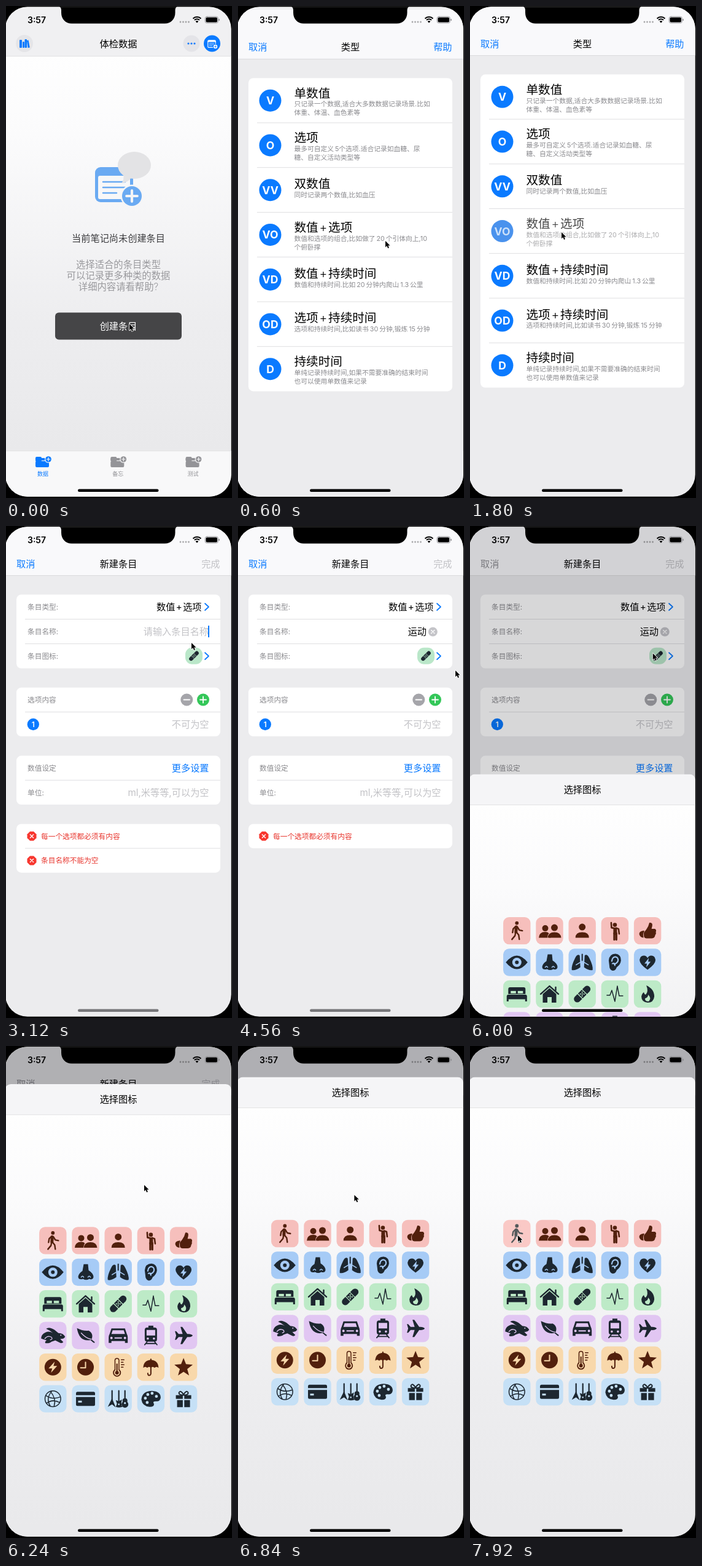
Recreate the animation shown at these times as an HTML page with a canvas. Size 368 px wide and 800 px high, loop 8000 ms.

```html
<!DOCTYPE html>
<html lang="zh-CN">
<head>
<meta charset="utf-8">
<style>
html, body { margin: 0; width: 100%; height: 100%; overflow: hidden; background: #000; }
canvas { display: block; width: 368px; height: 800px; }
</style>
</head>
<body>
<canvas id="stage"></canvas>
<script>
const W = 368, H = 800, LOOP = 8000, STEP = 120;
const canvas = document.getElementById('stage');
const scale = window.devicePixelRatio || 1;
canvas.width = W * scale;
canvas.height = H * scale;
const g = canvas.getContext('2d');
const FONT = 'Inter, "Noto Sans CJK SC", "Noto Sans CJK", sans-serif';
const BLUE = '#0a7aff', GREY = '#8a8a8e', PALE = '#c2c2c6', PAGE = '#ececee';

// Drawing helpers
function text(s, x, y, size, color = '#000', weight = 400, align = 'left') {
  g.font = `${weight} ${size}px ${FONT}`;
  g.textAlign = align;
  g.fillStyle = color;
  const spaced = s.replace(/ \+ /g, '\u200a+\u200a').replace(/ /g, '\u2009');
  g.fillText(spaced, x, y + size * 0.37);
}
function rect(x, y, w, h, color) {
  g.fillStyle = color;
  g.fillRect(x, y, w, h);
}
function round(x, y, w, h, r, color) {
  g.fillStyle = color;
  g.beginPath();
  g.roundRect(x, y, w, h, r);
  g.fill();
}
function disc(x, y, r, color, ry = r) {
  g.fillStyle = color;
  g.beginPath();
  g.ellipse(x, y, r, ry, 0, 0, 7);
  g.fill();
}
function line(d, width, color) {
  g.lineWidth = width;
  g.strokeStyle = color;
  g.stroke(new Path2D(d));
}
function fill(d, color) {
  g.fillStyle = color;
  g.fill(new Path2D(d));
}
function at(x, y, k, alpha, draw) {
  g.save();
  g.translate(x, y);
  g.scale(k, k);
  g.globalAlpha *= alpha;
  draw();
  g.restore();
}

// Icons: f fill, c cut out, l line, k cut line (with width); "o x y r" is a circle
const art = {
  walk: 'f o0 -12.5 2.9|l5 M-1 -6L-1.5 2|l2.4 M-2 -7L-6 -3L-7 3M1 -6L4 -1L9 0M-1 2L3 7L4 14M-2 2L-3 8L-8 14',
  pair: 'f o-7 -4 5M-17.5 11.5Q-17 2 -7 2Q1 2 2 11.5Z|k3 o8 -5 5.5M-2 11.5Q-1 2 8 2|f o8 -5 5.5M-3 11.5Q-2 2.5 8 2.5Q18 2.5 19 11.5Z',
  person: 'f o0 -6 5.5M-11 11.5Q-11 2.5 0 2.5Q11 2.5 11 11.5Z',
  wave: 'f o0 -9.5 3.3|l6 M.5 -2V4|l2.6 M-6 -13L-5.5 -5L-1 -4M2 -4.5L6 -3L7 5|l3.2 M-1 4V14.5M2.4 4V14.5',
  thumb: 'f M-2 -2L1 -7L3 -13Q9 -14 7.5 -7L6.5 -3H12Q15 -1 13.5 2Q14.5 5 12.5 7Q12 12 7 12.5H-2Q-6 12 -6 8V3ZM-7 0Q-14 1 -13.5 6Q-12 11 -6.5 11.5Q-8 5 -5 0Z',
  eye: 'f M-18 0Q0 -22 17.5 0Q0 22 -18 0Z|c o0 0 7.5|f o0 0 3',
  nose: 'f M-3 -13H4L5 -3Q13 2 13 8Q12 13 6 11Q1 14 -4 11Q-12 13 -12 7Q-11 2 -5 -2Z|k1.5 M-7 8Q-5 5 -3 8M4 8Q6 5 8 8',
  lungs: 'f M-4 -11Q-8 -15 -12 -6Q-18 6 -17 12.5Q-11 14 -3 8ZM4 -11Q8 -15 12 -6Q18 6 17 12.5Q11 14 3 8Z|l2 M0 -13V-2|k1.5 M0 -2L-10 4M0 -2L10 4',
  ear: 'f M-10 -3Q-9 -14 1 -14Q10 -13 10 -3Q9 4 3 8Q1 14 -4 13.5Q-9 12 -9 5Z|k2 M-5 -2Q-4 -9 1 -9Q6 -8 5 -2Q3 2 -1 3M-4 2Q0 0 0 5',
  heart: 'f M0 12Q-13 3 -13 -4Q-12 -11 -6 -11Q-2 -11 0 -7Q2 -11 6 -11Q12 -11 13 -4Q13 3 0 12Z|c M2 -7L-5 2H-1L-2 8L5 -1H1Z',
  bed: 'f M-11 -11H11Q14 -11 14 -8V0H-14V-8Q-14 -11 -11 -11ZM-16.5 3Q-16 1 -14 1H14Q16 1 16.5 3V12H13.5V8.5H-13.5V12H-16.5Z|c M-10 -5H-1.5V-1H-10ZM1.5 -5H10V-1H1.5Z',
  house: 'l2.4 M-14.5 0L0 -13L14.5 0M10 -11V-6|f M-11 0L0 -9.5L11 0V14H3.5V5H-3.5V14H-11Z',
  bandage: 'l11 M-8 8L8 -8|k1.2 M-8 -1L1 8M-1 -8L8 1|c o0 0 1.1o-3 0 1.1o3 0 1.1o0 -3 1.1o0 3 1.1',
  pulse: 'l1.5 M-13 2H-8L-5 -6L0 12L4 -13L7 3H13',
  flame: 'f M-2 -14Q11 -8 11 4Q10 14 0 14Q-10 13 -10 4Q-9 -1 -6 -3Q-5 1 -3 1Q2 -4 -2 -14Z|c M1 1Q7 7 2 12Q-5 12 -4 7Q1 6 1 1Z',
  hare: 'f M-19 5Q-19 -2 -12 -5Q-6 -8 0 -4Q-6 -9 -11 -11Q-6 -15 3 -9L9 -4Q17 -4 20 2Q18 6 12 5.5Q15 9 17 10.5Q16 13 12 12L4 8L-2 10Q-5 13 -12 12.5Q-14 10 -10 8Z|c o13 -.5 1|k1.3 M-13 5Q-8 -1 -2 3Q0 6 -4 7',
  leaf: 'f M-14 -12Q-4 -7 5 -8Q14 -3 9.5 7Q-10 12 -14 -12Z|l2 M6 4Q11 9 14 11|k1.3 M-7 -4Q1 5 9 6',
  car: 'f M-11 -11.5H11L14 -2.5Q15.5 0 15.5 3V12H11V9H-11V12H-15.5V3Q-15.5 0 -14 -2.5Z|c M-9 -8.5H9L11 -2.5H-11Zo-11 4 2o11 4 2M-6 3H6V5H-6Z',
  train: 'f M-6 -13H6Q10 -13 10 -9V6Q10 10 6 10H-6Q-10 10 -10 6V-9Q-10 -13 -6 -13ZM-4 -16H4V-13H-4Z|c M-7 -9H7V0H-7Zo-5 5 1.8o5 5 1.8|l1.8 M-6 10L-10 15M6 10L10 15M-8 13H8',
  plane: 'f M15 0Q13 -3 6 -2.5L-2 -14H-5L-1.5 -2.5H-8L-12 -7H-14L-12 0L-14 7H-12L-8 2.5H-1.5L-5 14H-2L6 2.5Q13 3 15 0Z',
  bolt: 'f o0 0 13.5|c M3 -9L-7 2H-1L-3 9L7 -2H1Z',
  clock: 'f o0 0 13.5|k2 M0 -8V1H-8',
  heat: 'l8 M-2 -11V8|f o-2 9 6.5|k5 M-2 -11V8|c o-2 9 4.7|l2 M-2 -5V9|f o-2 9 3|l1.6 M5 -12H9.5M5 -8H8M5 -4H9.5M5 0H8',
  umbrella: 'f M-12.5 1Q-12 -11 0 -12Q12 -11 12.5 1Q9 -2 6 1Q3 -2 0 1Q-3 -2 -6 1Q-9 -2 -12.5 1Z|l2 M0 -13V10Q0 14 -4 13Q-5 12 -5 10',
  star: 'f M0 -15L4 -5L15 -4L6 3L9 13.5L0 7.5L-9 13.5L-6 3L-15 -4L-4 -5Z',
  globe: 'l1.5 o0 0 12.8M-11 -5Q0 2 12 -3M-10 7Q0 0 11 6M-4 -12Q6 0 2 12M-2 -12Q-12 0 -4 12',
  card: 'f M-13 -11.5H13Q15.5 -11.5 15.5 -9V-6H-15.5V-9Q-15.5 -11.5 -13 -11.5ZM-15.5 -3H15.5V9Q15.5 11.5 13 11.5H-13Q-15.5 11.5 -15.5 9Z|c M-12 3H-6V6H-12Z',
  guitars: 'l2.2 M-10 -13V6M1 -13V6M11 -13V6|f M-10 -1L-17 13L-10 9L-4 14ZM-4 2L1 4L6 1L5 7L7 13Q1 15 -4 13L-2 8Zo11 3 4o11 9 5.5|c o1 9 1.3o11 7 1.6',
  palette: 'f M-15.5 1Q-14 -13 2 -13Q16 -12 16 -2Q15 5 8 4Q2 4 5 8Q6 13 -2 13Q-14 12 -15.5 1Z|c o-9 -1 2.4o-5 -7 2.4o2 -9 2.4o9 -4 2.4o-6 6 2.4',
  gift: 'f M-12.5 -6H-1.2V0H-12.5ZM1.2 -6H12.5V0H1.2ZM-10.5 2H-1.2V13.5H-10.5ZM1.2 2H10.5V13.5H1.2Z|l2 M0 -6Q-8 -6 -7.5 -10Q-5 -15 0 -7Q5 -15 7.5 -10Q8 -6 0 -6'
};
const DARK = '#1d2730', BROWN = '#52200d';
const shelves = [
  ['#f6bfbc', BROWN, 'walk pair person wave thumb'],
  ['#a6cbf6', DARK, 'eye nose lungs ear heart'],
  ['#bdeac7', DARK, 'bed house bandage pulse flame'],
  ['#e1c6f2', DARK, 'hare leaf car train plane'],
  ['#f8d8ab', BROWN, 'bolt clock heat umbrella star'],
  ['#c5e0f6', DARK, 'globe card guitars palette gift']
];
function circlePath(_, x, y, r) {
  return `M${x - r} ${y}a${r} ${r} 0 1 0 ${2 * r} 0a${r} ${r} 0 1 0 ${-2 * r} 0Z`;
}
function icon(name, ink, bg) {
  for (const part of art[name].split('|')) {
    const cut = part.indexOf(' ');
    const op = part[0], width = +part.slice(1, cut);
    const d = part.slice(cut + 1).replace(/o(-?[\d.]+) (-?[\d.]+) ([\d.]+)/g, circlePath);
    const color = 'ck'.includes(op) ? bg : ink;
    if (width) line(d, width, color); else fill(d, color);
  }
}

// Motion helpers
const sprung = (t, start) => {
  const x = Math.max(0, t - start) * 0.01826;
  return (1 + x) * Math.exp(-x);
};
const track = [
  [0, 201, 517], [240, 201, 517], [600, 240, 382], [960, 240, 382], [1680, 149, 368],
  [2040, 149, 368], [2760, 302, 178], [3120, 302, 190], [3360, 302, 190], [4080, 354, 235],
  [4560, 354, 235], [5400, 302, 206], [5960, 302, 206], [6240, 225, 226], [6600, 210, 230],
  [7560, 78, 308], [8000, 78, 308]
];
function pointer(t) {
  const i = track.findIndex(p => p[0] > t);
  const [a, b] = [track[i - 1], track[i]];
  const u = (t - a[0]) / (b[0] - a[0]), e = u * u * (3 - 2 * u);
  at(a[1] + (b[1] - a[1]) * e, a[2] + (b[2] - a[2]) * e, 0.9, 1, () => {
    const d = 'M0 0V11.5L2.7 9L4.6 13.2L6.6 12.3L4.8 8.2H8.4Z';
    line(d, 1.8, '#fff');
    fill(d, '#000');
  });
}

function backdrop(top) {
  const grad = g.createLinearGradient(0, top, 0, 720);
  grad.addColorStop(0, '#fefefe');
  grad.addColorStop(0.2, '#fbfbfc');
  grad.addColorStop(0.68, '#ededef');
  grad.addColorStop(1, '#e9e9eb');
  rect(0, top, W, H, grad);
}

function note(bg, color) {
  round(-31, -28, 62, 57, 9, color);
  round(-26, -14, 52, 38, 3, bg);
  line('M-18 -4H18M-18 5H18M-18 14H4', 2.6, color);
}
function plus(x, y, r, color, bg, ring) {
  disc(x, y, r + ring, bg);
  disc(x, y, r, color);
  const k = r * 0.55;
  line(`M${x - k} ${y}h${2 * k}M${x} ${y - k}v${2 * k}`, r * 0.26, bg);
}

function home() {
  backdrop(82);
  rect(0, 0, W, 82, '#f0f0f2');
  rect(0, 81.5, W, 0.7, '#dcdcde');
  disc(30, 61, 14, '#e5e5e8');
  round(22, 55, 4, 13, 1, BLUE);
  round(27, 58, 3, 10, 1, BLUE);
  round(30.5, 54, 3.5, 14, 1, BLUE);
  fill('M34 56l2.5 -.6l2.3 12l-3.3 .6z', BLUE);
  text('体检数据', 183, 61, 15.3, '#000', 500, 'center');
  disc(302, 61, 13.5, '#e4e4e8');
  for (const x of [297, 302, 307]) disc(x, 61, 1.6, BLUE);
  disc(335.5, 61, 13.5, BLUE);
  at(335, 61.5, 0.22, 1, () => note(BLUE, '#fff'));
  plus(341, 66, 3.2, '#fff', BLUE, 1);

  const blue = '#6aaaf2';
  at(176, 290, 1, 1, () => note('#f7f7f8', blue));
  disc(209, 259, 27, '#e3e3e5', 22);
  fill('M191 272Q193 283 188 288Q199 287 204 279Z', '#e3e3e5');
  plus(205, 309, 16, blue, '#f5f5f6', 2.5);

  text('当前笔记尚未创建条目', 183, 377, 15.2, '#3c3c3f', 400, 'center');
  ['选择适合的条目类型', '可以记录更多种类的数据', '详细内容请看帮助?'].forEach((s, i) =>
    text(s, 183, 420 + 18 * i, 15.35, '#99999d', 300, 'center'));
  round(80, 498.5, 206, 44, 6, '#454547');
  text('创建条目', 183, 520.5, 15.2, '#fff', 500, 'center');

  rect(0, 723, W, 80, '#f8f8f9');
  rect(0, 723, W, 0.7, '#dadadc');
  ['数据', '备忘', '测试'].forEach((s, i) => {
    const x = 60 + 122.3 * i, c = i ? '#949498' : BLUE;
    round(x - 12, 733, 10, 8, 2, c);
    round(x - 12, 735, 22, 4, 1.5, c);
    round(x - 12, 740, 22, 10, 2, c);
    plus(x + 9, 737, 4.8, c, '#f8f8f9', 1.2);
    text(s, x, 760.5, 9, c, 500, 'center');
  });
}

function navBar(title, right, rightColor, tint = BLUE) {
  rect(0, -1, W, H + 2, PAGE);
  rect(0, 0, W, 80, '#f9f9fb');
  rect(0, 80, W, 0.8, '#d8d8da');
  text('取消', 17, 61, 15.2, tint);
  text(title, 183, 61, 15.2, '#000', 500, 'center');
  text(right, 348.5, 61, 15.2, rightColor, 400, 'right');
}
function card(y, rows, pitch) {
  round(17, y, 332, rows * pitch, 8, '#fff');
  for (let i = 1; i < rows; i++) rect(31, y + i * pitch - 0.5, 318, 1, '#dfdfe1');
}

const kinds = [
  ['V', '单数值', '只记录一个数据,适合大多数数据记录场景.比如', '体重、体温、血色素等'],
  ['O', '选项', '最多可自定义 5个选项.适合记录如血糖、尿', '糖、自定义活动类型等'],
  ['VV', '双数值', '同时记录两个数值,比如血压'],
  ['VO', '数值 + 选项', '数值和选项的组合,比如做了 20 个引体向上,10', '个俯卧撑'],
  ['VD', '数值 + 持续时间', '数值和持续时间.比如 20 分钟内爬山 1.3 公里'],
  ['OD', '选项 + 持续时间', '选项和持续时间,比如读书 30 分钟,锻炼 15 分钟'],
  ['D', '持续时间', '单纯记录持续时间,如果不需要准确的结束时间', '也可以使用单数值来记录']
];
function typePage(t) {
  navBar('类型', '帮助', BLUE);
  const pitch = 72.75;
  card(111.3, kinds.length, pitch);
  kinds.forEach(([mark, title, first, second], i) => {
    const pressed = i === 3 && t >= 1800;
    at(0, 147.8 + i * pitch, 1, pressed ? 0.72 : 1, () => {
      const lift = second ? 0 : 2.1;
      disc(52.5, 0, 18, pressed ? '#0568e6' : BLUE);
      text(mark, 52.5, 0, 17.6, '#fff', 700, 'center');
      text(title, 91.5, -12.4 + lift, 19.6, '#000', 350);
      text(first, 91.5, 5.8 + lift, 10.75, GREY);
      if (second) text(second, 91.5, 19.8, 10.75, GREY);
    });
  });
}

function cross(x, y, k, color) {
  line(`M${x - k} ${y - k}l${2 * k} ${2 * k}M${x + k} ${y - k}l${-2 * k} ${2 * k}`, 1.4, color);
}
function chevron(y) {
  line(`M324 ${y - 5.5}L330 ${y}L324 ${y + 5.5}`, 1.7, BLUE);
}
function failure(s, y) {
  fill(`M39 ${y - 7.5}h6l4.5 4.5v6l-4.5 4.5h-6l-4.5 -4.5v-6z`, '#f7372f');
  cross(42, y, 2.6, '#fff');
  text(s, 57, y, 11.7, '#e8362e');
}
function nameField(t) {
  const typed = 'yun dong';
  const named = t >= 3360, done = t >= 4560;
  let value = '请输入条目名称';
  if (done) value = '运动';
  else if (named) value = typed.slice(0, 1 + Math.floor((t - 3360) / 135));
  const right = named ? 307 : 330;
  text(value, right, 171.5, 15.2, named ? '#000' : PALE, 400, 'right');
  if (named) {
    const width = g.measureText(value).width;
    if (!done) rect(right - width, 180, width, 1, '#000');
    disc(317.3, 172, 7.5, '#c4c4c8');
    cross(317.3, 172, 2.6, '#fff');
  }
  const typing = named && !done;
  if (t >= 2880 && t < 5520 && (typing || (t - 2880) % 1000 < 600)) {
    rect(right - 1, 162, 2, 19, BLUE);
  }
}
function formPage(t) {
  navBar('新建条目', '完成', PALE, t > 5903 ? '#8e8e93' : BLUE);
  card(111.5, 3, 40);
  text('条目类型:', 35, 131.5, 11.7, GREY);
  text('数值 + 选项', 318.5, 131.5, 15.2, '#000', 400, 'right');
  chevron(131.5);
  text('条目名称:', 35, 171.5, 11.7, GREY);
  nameField(t);
  text('条目图标:', 35, 211.5, 11.7, GREY);
  at(306, 211.3, 1, t >= 5760 && t < 6000 ? 0.8 : 1, () => {
    round(-14, -13.5, 28, 27, 11, '#bae7c9');
    at(0, 0, 0.58, 1, () => icon('bandage', DARK, '#bae7c9'));
  });
  chevron(211.5);

  card(262.7, 2, 39.7);
  text('选项内容', 35, 282.5, 11.7, GREY);
  disc(294.3, 282.5, 10, '#a5a5aa');
  line('M289.5 282.5h9.6', 1.8, '#fff');
  disc(321, 282.5, 10, '#34c759');
  line('M316 282.5h10M321 277.5v10', 1.8, '#fff');
  disc(44.3, 322.5, 9.7, BLUE);
  text('1', 44.3, 322.5, 12, '#fff', 600, 'center');
  text('不可为空', 330.5, 322.5, 15.2, PALE, 400, 'right');

  card(373.6, 2, 39.7);
  text('数值设定', 35, 393.3, 11.7, GREY);
  text('更多设置', 330.5, 393.3, 15.2, BLUE, 400, 'right');
  text('单位:', 35, 433.3, 11.7, GREY);
  text('ml,米等等,可以为空', 330.5, 433.3, 15.2, PALE, 400, 'right');

  const unnamed = t < 3360;
  card(484.5, unnamed ? 2 : 1, 39.6);
  failure('每一个选项都必须有内容', 504.3);
  if (unnamed) failure('条目名称不能为空', 544);
}

function iconSheet(t) {
  const hidden = sprung(t, 5903);
  rect(0, 0, W, H, `rgba(0,0,10,${0.3 * (1 - hidden)})`);
  g.save();
  g.translate(0, 50.5 + 749 * hidden);
  g.beginPath();
  g.roundRect(-1.2, 0, 368, 760, [9, 9, 0, 0]);
  g.clip();
  backdrop(49);
  rect(0, 0, W, 49.5, '#f5f5f7');
  rect(0, 49.5, W, 0.8, '#dcdcde');
  text('选择图标', 183, 24.4, 15.2, '#000', 500, 'center');
  shelves.forEach(([bg, ink, names], row) => names.split(' ').forEach((name, col) => {
    const pressed = name === 'walk' && t >= 7800;
    at(76.3 + 53.2 * col, 254.5 + 51.45 * row, 1, 1, () => {
      round(-22.2, -22.2, 44.4, 44.4, 9.5, pressed ? '#fac9c6' : bg);
      icon(name, pressed ? '#555a5c' : ink, bg);
    });
  }));
  g.restore();
}

function statusBar(t) {
  text('3:57', 50, 22.5, 14, '#000', 600, 'center');
  for (let i = 0; i < 4; i++) disc(284 + 4.5 * i, 26, 1.4, 'rgba(0,0,0,.32)');
  g.strokeStyle = '#000';
  g.lineWidth = 2;
  g.lineCap = 'butt';
  for (const r of [9.2, 5.8]) {
    g.beginPath();
    g.arc(311, 27, r, -2.35, -0.79);
    g.stroke();
  }
  fill('M311 27.6L308.6 25Q311 22.8 313.4 25Z', '#000');
  g.lineCap = 'round';
  g.lineWidth = 0.8;
  g.strokeStyle = '#8a8a8d';
  g.beginPath();
  g.roundRect(324, 17.2, 21.5, 10.6, 3.2);
  g.stroke();
  round(325.4, 18.6, 18.7, 7.8, 2, '#000');
  round(346.4, 20.7, 1.4, 3.6, 0.7, '#8a8a8d');
  const dimmed = t >= 2640 && t < 6000;
  round(117, 785.5, 131.5, 4.5, 2.2, dimmed ? '#77777a' : '#000');
}

function draw(t) {
  g.setTransform(scale, 0, 0, scale, 0, 0);
  g.lineCap = g.lineJoin = 'round';
  rect(0, 0, W, H, '#000');
  g.save();
  g.beginPath();
  g.roundRect(-1.2, 1.3, 368, 796.4, 36);
  g.clip();
  if (t < 960) home();
  if (t >= 2040) {
    formPage(t);
  } else if (t > 217) {
    at(0, H * sprung(t, 217), 1, 1, () => typePage(t));
  }
  if (t > 5903) iconSheet(t);
  statusBar(t);
  fill('M84 0Q90 1 90 7V11C90 21 97 28.6 107 28.6H258.5C268.5 28.6 275.5 21 275.5 11V7Q275.5 1 281.5 0Z', '#000');
  g.restore();
  pointer(t);
}

function tick(now) {
  const t = now % LOOP;
  draw(Math.floor(t / STEP) * STEP);
  requestAnimationFrame(tick);
}
requestAnimationFrame(tick);
</script>
</body>
</html>
```
